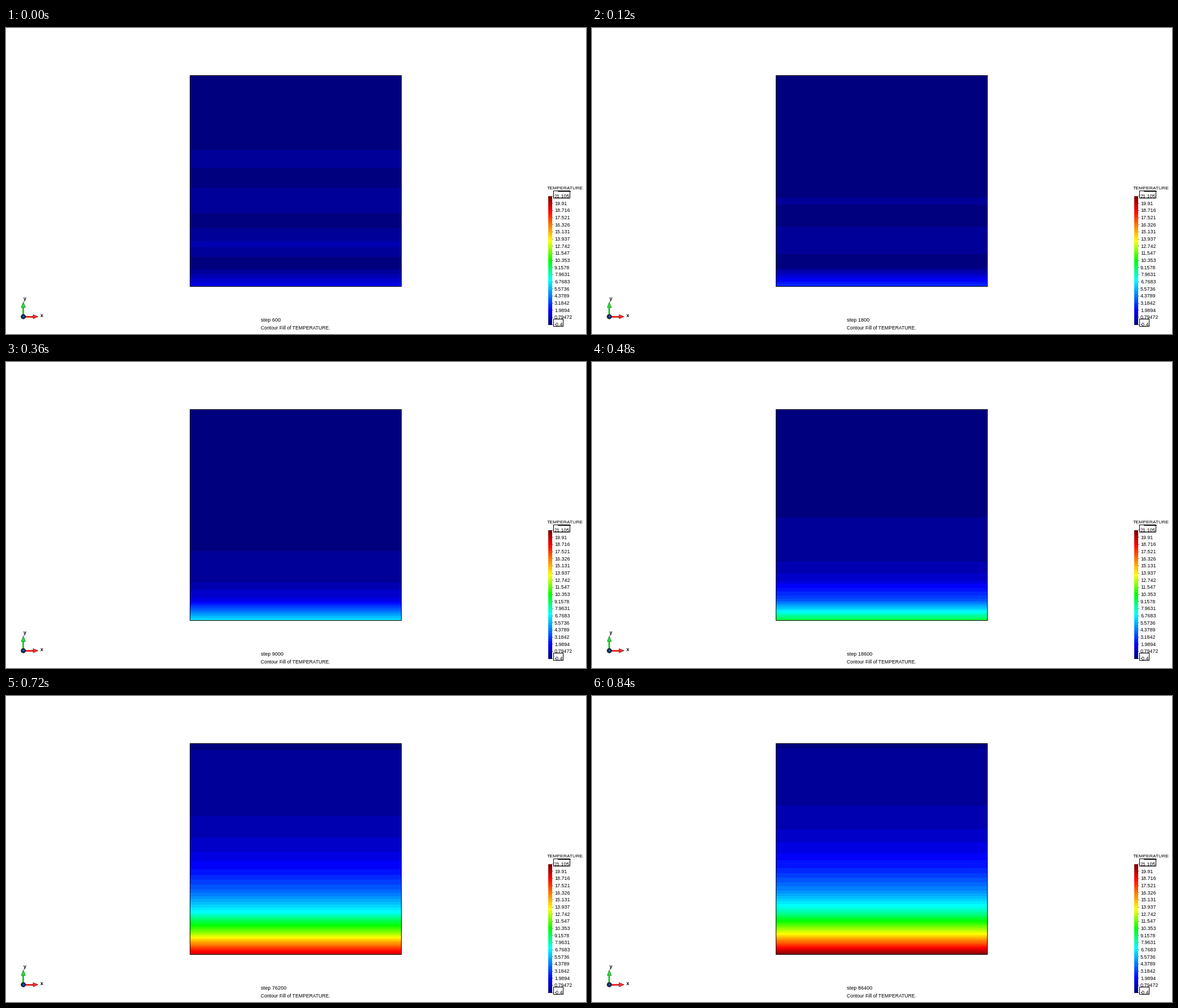
A matplotlib script that plays this animation: 1029 by 544 pixels, repeating every 960 ms.

```python
import math

import matplotlib.pyplot as plt
import numpy as np
from matplotlib.animation import FuncAnimation
from matplotlib.patches import Circle, Polygon, Rectangle

W, H, DPI = 1029, 544, 100
PX = 72 / DPI  # points per pixel
T_MIN, T_MAX, LEVELS = -0.4, 21.105, 50
LEFT, RIGHT, TOP, BOTTOM = 327, 701, 85, 459  # inside of the square
FRAMES, END = 8, 86400
CELLS = 10

K = np.arange(CELLS + 1)
NODES = np.linspace(0, BOTTOM + 1 - TOP, CELLS + 1)  # height above the base
HEIGHTS = BOTTOM + 1 - (np.arange(TOP, BOTTOM) + 0.5)
# Heating of a half space by a constant flux, relative to the surface value
ETA = np.linspace(0, 3, 601)
FLUX = np.exp(-ETA**2) - math.sqrt(math.pi) * ETA * np.array(
    [math.erfc(e) for e in ETA])


def contour_colors():
    stops = [0, .105, .345, .5, .655, .895, 1]
    rgb = [(0, 0, .5), (0, 0, 1), (0, 1, 1), (0, 1, 0),
           (1, 1, 0), (1, 0, 0), (.5, 0, 0)]
    s = np.linspace(0, 1, LEVELS)
    return np.stack([np.interp(s, stops, c) for c in zip(*rgb)], axis=1)


COLORS = contour_colors()


def step_number(i):
    return min(600 * (2 ** (i + 1) - 1), END)


def node_levels(i):
    """Contour level at each mesh node, with the wiggles of the first steps."""
    growth = math.sqrt(step_number(i) / END)
    depth = growth * ETA * (161.4 + 13.3 * ETA**2)
    temp = T_MAX * growth * np.interp(NODES, depth, FLUX)
    temp[-1] = 0  # cold top edge
    level = (temp - T_MIN) / (T_MAX - T_MIN) * LEVELS
    wiggle = 3**i * (.6 * 2.0 ** (-i * i)) ** K * (1.2 + 2.5 * (-1.0) ** K)
    wiggle[0] = 0
    return level + wiggle


def field(i):
    level = np.interp(HEIGHTS, NODES, node_levels(i)).astype(int)
    return COLORS[np.clip(level, 0, LEVELS - 1)][:, None, :]


fig = plt.figure(figsize=(W / DPI, H / DPI), dpi=DPI, facecolor="white")
ax = fig.add_axes([0, 0, 1, 1])
ax.axis("off")


def label(x, y, s, size, **kw):
    return ax.text(x, y, s, fontsize=size * PX, family="Liberation Sans",
                   color="black", va="baseline", **kw)


def rect(x0, y0, x1, y1, color="black"):
    ax.add_patch(Rectangle((x0, y0), x1 - x0, y1 - y0, fc=color, lw=0))


def box(x0, y0, x1, y1):
    rect(x0, y0, x1, y1)
    rect(x0 + 1, y0 + 1, x1 - 1, y1 - 1, "white")


def strip(pixels, x0, y0, x1, y1):
    return ax.imshow(pixels, extent=(x0, x1, y1, y0), zorder=2,
                     interpolation="nearest", aspect="auto")


def draw_legend():
    label(960, 287, "TEMPERATURE", 8.5)
    strip(COLORS[::-1][:, None, :], 962, 299, 969, 528)
    box(971, 289, 1001, 303)
    rect(979, 290, 1002, 291)
    box(971, 517, 989, 531)
    for i, value in enumerate(np.linspace(T_MAX, T_MIN, 19)):
        y = 298.5 + 12.67 * i
        label(973, y + 3.5, f"{value:.5g}", 8.9)
        rect(969, round(y), 971, round(y) + 1, "#888888")


def draw_axes_triad():
    rect(29, 496, 32, 513, "#22c832")
    rect(31, 512, 48, 515, "#e02828")
    ax.add_patch(Polygon([(30.7, 487), (27, 497), (34.5, 497)],
                         fc="#30d840", ec="#157a20", lw=.5, zorder=3))
    ax.add_patch(Polygon([(57, 513.2), (48, 509.5), (48, 517)],
                         fc="#f03030", ec="#901818", lw=.5, zorder=3))
    ax.add_patch(Circle((30.7, 513.2), 4, fc="#10305c", ec="black",
                        lw=.5, zorder=4))
    ax.add_patch(Circle((31.2, 513), 1.5, fc="#2858a8", lw=0, zorder=5))
    label(30.5, 484, "y", 9, weight="bold")
    label(60.5, 513.5, "x", 9, weight="bold")


draw_legend()
draw_axes_triad()
rect(LEFT - 1, TOP - 1, RIGHT + 1, BOTTOM + 1)
image = strip(field(0), LEFT, TOP, RIGHT, BOTTOM)
step_text = label(452, 522.5, "", 9.1)
label(452, 536.5, "Contour Fill of TEMPERATURE.", 8.7)
ax.set_xlim(0, W)
ax.set_ylim(H, 0)


def update(i):
    image.set_data(field(i))
    step_text.set_text(f"step {step_number(i)}")
    return image, step_text


anim = FuncAnimation(fig, update, frames=FRAMES, interval=120,
                     repeat=True, repeat_delay=0)
plt.show()
```
